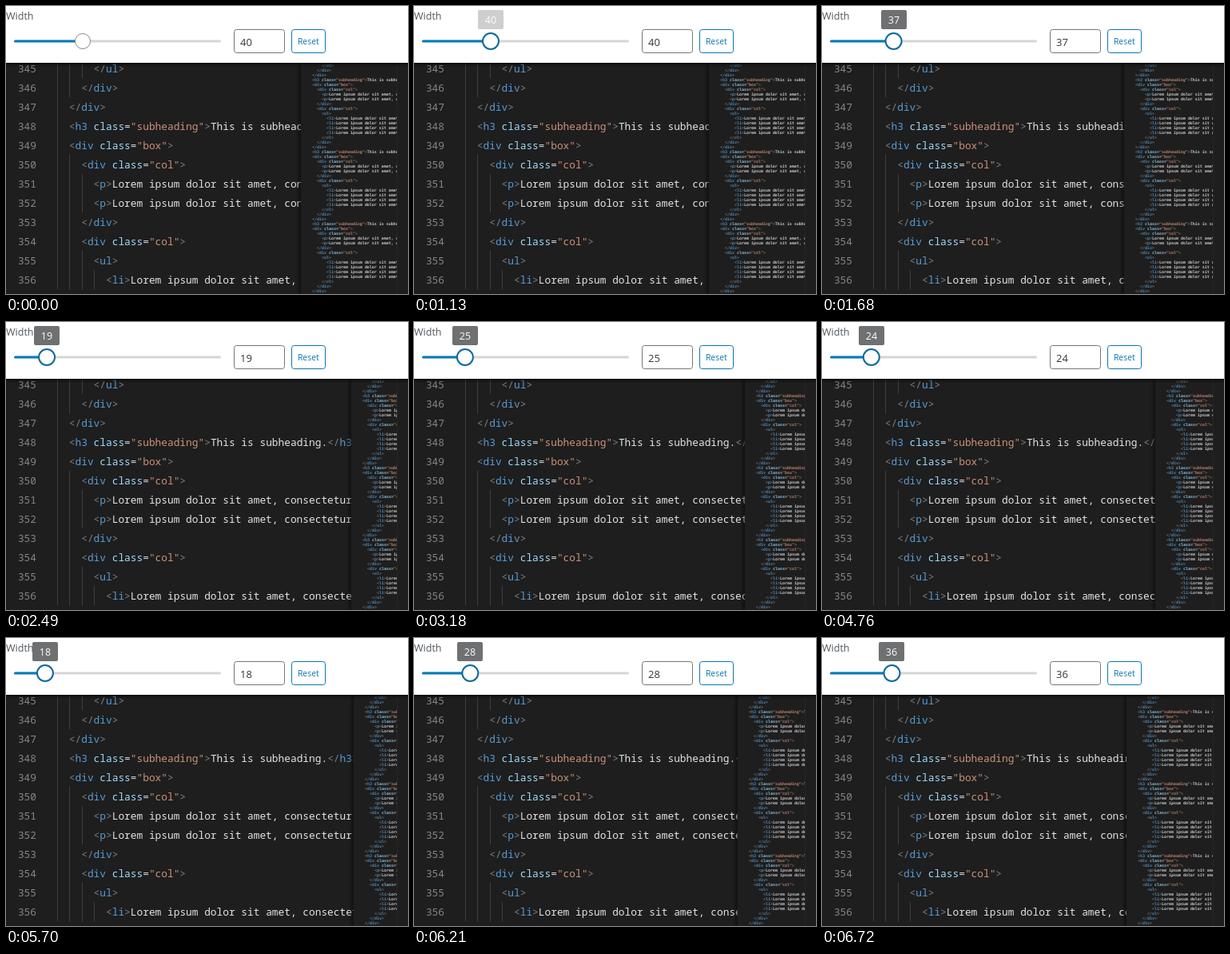
An HTML page for the animation above (7080 ms loop, 503 by 360 pixels).

```html
<!DOCTYPE html>
<html lang="en">
<head>
<meta charset="utf-8">
<title>Minimap width</title>
<style>
  html, body { margin: 0; width: 100%; height: 100%; overflow: hidden; background: #fff; }
  svg { display: block; width: 503px; height: 360px; }
  text { white-space: pre; }
  .ui { font-family: "Open Sans", "Noto Sans", sans-serif; }
  .code { font: 12.83px "Noto Sans Mono", "DejaVu Sans Mono", monospace; }
  .mini { font: bold 4.98px "DejaVu Sans Mono", monospace; opacity: .85; }
</style>
</head>
<body>
<svg viewBox="0 0 503 360">
  <defs>
    <linearGradient id="down" x2="0" y2="1">
      <stop stop-color="#000" stop-opacity=".6"/><stop offset="1" stop-color="#000" stop-opacity="0"/>
    </linearGradient>
    <linearGradient id="left">
      <stop stop-color="#000" stop-opacity="0"/><stop offset="1" stop-color="#000" stop-opacity=".45"/>
    </linearGradient>
    <clipPath id="codeClip"><rect id="codeArea" y="71" height="289"/></clipPath>
    <clipPath id="miniClip"><rect y="71" width="489" height="289"/></clipPath>
  </defs>

  <rect width="503" height="360" fill="#fff"/>
  <rect y="71" width="503" height="289" fill="#1e1e1e"/>
  <g clip-path="url(#codeClip)">
    <g id="guides" fill="#404040"></g>
    <g id="code" class="code"></g>
  </g>
  <rect id="shade" y="71" width="6" height="289" fill="url(#left)"/>
  <g clip-path="url(#miniClip)"><g id="mini" class="mini"></g></g>
  <rect x="489" y="71" width="1" height="289" fill="#272727"/>
  <rect y="71" width="503" height="5" fill="url(#down)"/>

  <g class="ui">
    <text x="0" y="17" font-size="12.5" fill="#50575e">Width</text>
    <rect x="10" y="42.5" width="259" height="3" rx="1.5" fill="#d5d5d5"/>
    <rect id="fill" x="10" y="42.5" height="3" rx="1.5" fill="#007cba"/>
    <circle id="knob" cy="44" fill="#fff"/>
    <rect x="285.5" y="29.5" width="63" height="29" rx="3" fill="#fff" stroke="#757575"/>
    <text id="field" x="293" y="50.4" font-size="13" fill="#32373c"></text>
    <rect x="357.5" y="29.5" width="42" height="29" rx="3" fill="#fff" stroke="#0a76b0"/>
    <text x="378.3" y="48" font-size="10.4" text-anchor="middle" fill="#0a76b0">Reset</text>
    <g id="tip">
      <rect x="-16" y="5" width="32" height="24" rx="2" fill="#6f7072"/>
      <text id="tipText" y="21.6" font-size="12.5" text-anchor="middle" fill="#fff"></text>
    </g>
  </g>
</svg>
<script>
const LOOP = 7080, PRESS = 1130, START = 40;

// [start ms, ms per step, steps, final value]
const MOVES = [
  [1430, 83, 4, 37], [1730, 95, 5, 22], [2180, 77, 5, 19],
  [2920, 72, 10, 35], [3640, 70, 2, 37],
  [4390, 74, 6, 24], [4890, 60, 4, 18], [5140, 55, 3, 16],
  [5700, 85, 7, 28], [6260, 70, 2, 33], [6450, 70, 1, 34], [6650, 70, 2, 36]
];

const LOREM = "Lorem ipsum dolor sit amet, consectetur adipiscing elit.";
const P = [2, `<p>${LOREM}</p>`], LI = [3, `<li>${LOREM}</li>`];
const COL = [1, '<div class="col">'], END = [1, "</div>"];
const BLOCK = [
  [0, '<h3 class="subheading">This is subheading.</h3>'],
  [0, '<div class="box">'],
  COL, P, P, END,
  COL, [2, "<ul>"], LI, LI, LI, LI, [2, "</ul>"], END,
  [0, "</div>"]
];
const FIRST = 12; // block line shown at the top

const TOKEN = /(<\/?)(\w+)|( class)(=)("\w+")|(>)|([^<>]+)/g;
const COLORS = ["#808080", "#569cd6", "#9cdcfe", "#d4d4d4", "#ce9178", "#808080", "#e4e4e4"];

const $ = id => document.getElementById(id);

function set(el, attrs) {
  for (const k in attrs) el.setAttribute(k, attrs[k]);
}

function add(parent, tag, attrs, text) {
  const el = document.createElementNS(parent.namespaceURI, tag);
  set(el, attrs);
  if (text !== undefined) el.textContent = text;
  parent.appendChild(el);
  return el;
}

function addLine(parent, source, x, y) {
  const line = add(parent, "text", { x, y });
  for (const [, ...groups] of source.matchAll(TOKEN))
    groups.forEach((part, i) => part && add(line, "tspan", { fill: COLORS[i] }, part));
}

const lineAt = i => BLOCK[(FIRST + i) % BLOCK.length];

function build() {
  for (let i = 0; i < 12; i++) {
    const [depth, source] = lineAt(i), y = 82.6 + 24 * i;
    add($("code"), "text", { x: 38, y, "text-anchor": "end", fill: "#858585" }, 345 + i);
    addLine($("code"), source, 78.8 + 15.4 * depth, y);
    for (let d = 0; d <= depth; d++)
      add($("guides"), "rect", { x: Math.round(64 + 15.4 * d), y: 66 + 24 * i, width: 1, height: 24 });
  }
  for (let i = 0; i < 48; i++) {
    const [depth, source] = lineAt(i);
    addLine($("mini"), source, 14 + 6 * depth, 75.8 + 6 * i);
  }
}

function valueAt(t) {
  let v = START;
  for (const [start, step, count, to] of MOVES) {
    if (t < start) break;
    const done = Math.min(count, 1 + Math.floor((t - start) / step));
    v += (to - v) * done / count;
  }
  return Math.round(v);
}

function draw(t) {
  const v = valueAt(t), x = 10.4 + 2.14 * v, edge = 489 - 3 * v;
  const active = t >= PRESS;
  const fade = active ? Math.min(3, 1 + Math.floor((t - PRESS) / 55)) / 3 : 0;

  set($("codeArea"), { width: edge });
  set($("shade"), { x: edge - 6 });
  set($("mini"), { transform: `translate(${edge} 0)` });
  set($("fill"), { width: x - 10 });
  set($("knob"), {
    cx: x,
    r: active ? 10 : 9.5,
    stroke: active ? "#0b6a9c" : "#7e8993",
    "stroke-width": active ? 2 : 1
  });
  set($("tip"), { transform: `translate(${Math.round(x)} 0)`, opacity: fade });
  $("field").textContent = $("tipText").textContent = v;
}

function tick() {
  draw(performance.now() % LOOP);
  requestAnimationFrame(tick);
}

build();
tick();
</script>
</body>
</html>
```
